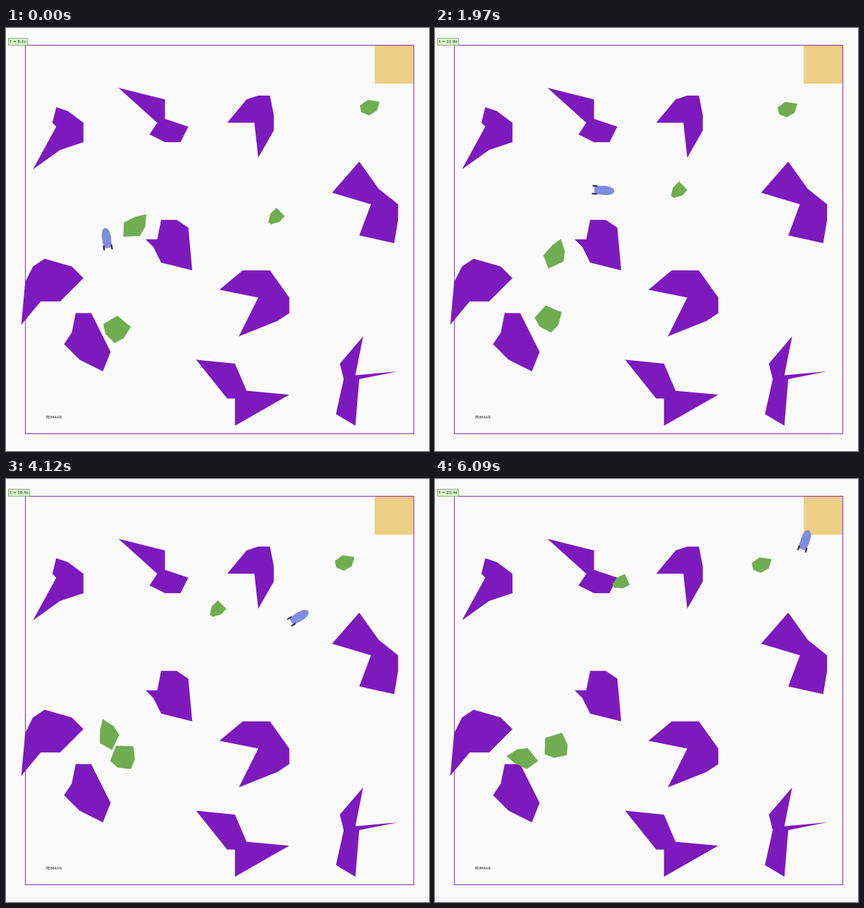
Recreate the animation shown at these times as a matplotlib script. Size 600 by 600 pixels, loop 6120 ms.

```python
import matplotlib.pyplot as plt
import numpy as np
from matplotlib.animation import FuncAnimation
from matplotlib.patches import Polygon, Rectangle

SIZE, DPI = 600, 100
FRAMES, STEP = 204, 30
X0, Y0, UNIT = 27.2, 24.2, 5.51
START, END = 8.16, 20.4

BACK, PURPLE, GREEN = "#fafafa", "#7d1abd", "#70ad51"
GOLD, BLUE, DARK = "#ecce85", "#7f8de1", "#26222c"

fig = plt.figure(figsize=(SIZE / DPI, SIZE / DPI), dpi=DPI, facecolor=BACK)
ax = fig.add_axes([0, 0, 1, 1])
ax.set(xlim=(0, SIZE), ylim=(SIZE, 0))
ax.axis("off")


def place(points, x, y, turn):
    c, s = np.cos(np.radians(turn)), np.sin(np.radians(turn))
    return np.asarray(points) @ np.array([(c, s), (-s, c)]) + (x, y)


def shape(points, color, z, **style):
    return ax.add_patch(Polygon(points, fc=color, zorder=z, **{"lw": 0, **style}))


def obstacle(*corners):
    """Fixed polygon, corners in arena units with y pointing down."""
    shape(np.array(corners) * UNIT + (X0, Y0), PURPLE, 3)


class Rock:
    """Drifting polygon; knots are (time, x, y, turn) at each bounce."""

    def __init__(self, outline, *knots):
        self.outline = outline
        self.knots = np.array(knots)
        self.patch = shape(outline, GREEN, 4)

    def move(self, t):
        times, *tracks = self.knots.T
        pose = [np.interp(t, times, track) for track in tracks]
        self.patch.set_xy(place(self.outline, *pose))


ax.add_patch(Rectangle((X0 + 90 * UNIT, Y0), 10 * UNIT, 10 * UNIT, fc=GOLD, lw=0, zorder=1))
ax.add_patch(Rectangle((X0, Y0), 100 * UNIT, 100 * UNIT, fill=False, ec=PURPLE,
                       lw=0.8, alpha=0.85, zorder=2))

obstacle((8, 16), (11, 17), (15, 20), (15, 25), (9, 27), (2, 32), (8, 21), (7, 20))
obstacle((24, 11), (36, 14), (36, 19), (42, 21), (40, 25), (36, 25), (32, 23), (34, 20))
obstacle((52, 20), (57, 14), (60, 13), (63, 13), (64, 18), (64, 22), (60, 29), (59, 20))
obstacle((86, 30), (91, 37), (96, 41), (96, 45), (95, 51), (86, 49), (89, 41), (79, 38))
obstacle((35, 45), (39, 45), (42, 47), (43, 58), (35, 56), (33, 52), (31, 50), (34, 50))
obstacle((5, 55), (12, 57), (15, 60), (9, 66), (4, 66), (-1, 72), (0, 61), (2, 57))
obstacle((13, 69), (17, 69), (22, 79), (20, 84), (14, 81), (10, 77), (12, 74))
obstacle((50, 63), (56, 58), (63, 58), (68, 65), (68, 69), (65, 71), (55, 75), (60, 65))
obstacle((44, 81), (54, 82), (57, 89), (68, 90), (54, 98), (54, 91), (52, 91))
obstacle((87, 75), (85, 85), (96, 84), (86, 86), (85, 98), (80, 95), (82, 86), (81, 82))

rocks = [
    Rock([(-13, -3), (-2, -11), (15, -8.5), (11, 4.5), (0, 11), (-11, 6.5)],
         (START, 515, 113, 0), (END, 462.3, 122.2, 0)),
    Rock([(0, -12), (12, 0), (4.5, 8), (-7.5, 11.5), (-11.5, 8), (-8.5, -3.5)],
         (START, 383.5, 267, 0), (20.13, 263.2, 146.7, 0), (END, 265, 146, 20)),
    Rock([(-17, -4), (0, -12.5), (15, -16), (13.5, 2), (6, 15), (-17.5, 16)],
         (START, 184, 280, 0), (9.3, 186, 296.1, 0),
         (19.56, 126.1, 390.3, -90), (END, 123.1, 395.5, -126.4)),
    Rock([(-17.8, -8.8), (2.2, -20.8), (21.2, -4.8), (11.2, 11.2), (-1.8, 18.2),
          (-14.8, 5.2)],
         (START, 155.8, 428.8, 0), (END, 172.6, 380.3, -57)),
]

# Ship waypoints: step, clock, x, y, heading
ROUTE = np.array([
    (0, START, 142.6, 298, -98),
    (32, 10.2, 185.5, 244, -43.5),
    (59, 11.88, 240, 230.5, 4),
    (74, 13.08, 295.8, 235.3, -5),
    (105, 15.12, 366, 227.3, -7),
    (142, 17.64, 461, 157.3, -55.5),
    (183, END, 525.3, 86.5, -71.8),
])
TIMES, POSES = ROUTE[:, 1], ROUTE[:, 2:]
SLOPES = np.gradient(POSES, TIMES, axis=0, edge_order=2)

arc = np.linspace(-np.pi / 2, np.pi / 2, 25)
nose = np.column_stack([1 + 13 * np.cos(arc), 6 * np.sin(arc)])
HULL = np.vstack([(-13.5, -5.2), nose, (-13.5, 5.2)])
THRUSTERS = [[(-17, y - 1), (-10, y - 1), (-10, y + 1), (-17, y + 1)] for y in (-5.6, 5.6)]

parts = [(shape(HULL, BLUE, 5, ec="#7078c4", lw=0.5), HULL)]
parts += [(shape(p, DARK, 6), p) for p in THRUSTERS]

font = dict(family="DejaVu Sans", size=4, color="#222222", va="baseline", zorder=8)
ax.text(56.3, 553.6, "PDM4AR", **font)
label = ax.text(5.6, 20.6, "", bbox=dict(boxstyle="square,pad=0.45", fc="#d7f4ca",
                                         ec="#79a868", lw=0.6), **font)


def clock(i):
    # Thirty steps a second, shown at 33 ticks a second
    tick = int((STEP * i + STEP - 1) * 33 / 1000)
    return np.interp((10 * tick + 4) // 11, ROUTE[:, 0], TIMES)


def ship_pose(t):
    j = min(max(np.searchsorted(TIMES, t, side="right") - 1, 0), len(TIMES) - 2)
    h = TIMES[j + 1] - TIMES[j]
    u = (t - TIMES[j]) / h
    v = 1 - u
    return (v * v * ((1 + 2 * u) * POSES[j] + u * h * SLOPES[j])
            + u * u * ((1 + 2 * v) * POSES[j + 1] - v * h * SLOPES[j + 1]))


def draw(i):
    t = clock(i)
    for rock in rocks:
        rock.move(t)
    pose = ship_pose(t)
    for patch, points in parts:
        patch.set_xy(place(points, *pose))
    label.set_text(f"t = {t:.1f}s")
    return [rock.patch for rock in rocks] + [patch for patch, _ in parts] + [label]


anim = FuncAnimation(fig, draw, frames=FRAMES, interval=STEP, repeat=True, repeat_delay=0)
plt.show()
```
